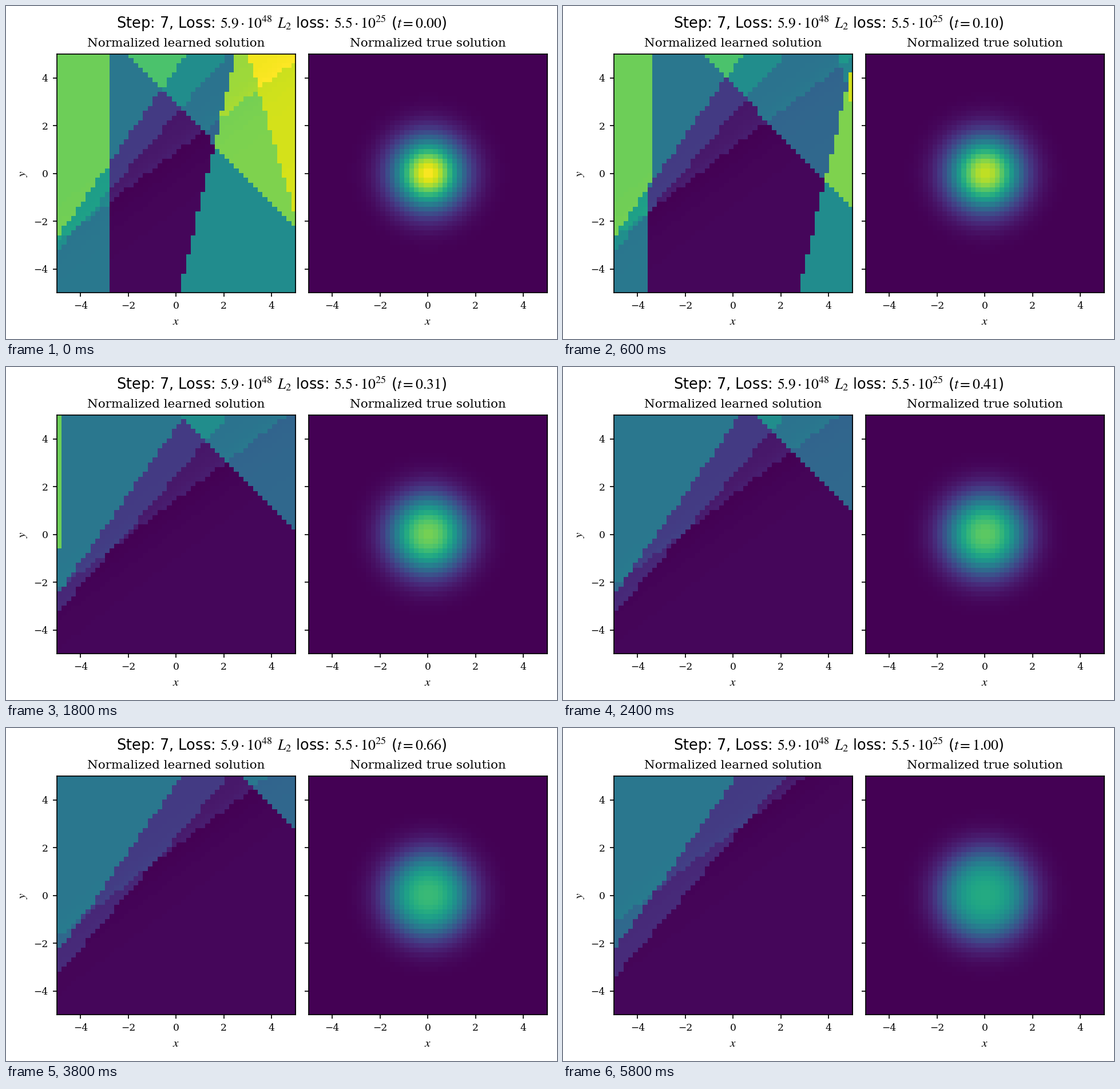
A matplotlib script for the animation above (6000 ms loop, 963 by 582 pixels).

```python
import numpy as np
import matplotlib.pyplot as plt
from matplotlib.animation import FuncAnimation

W, H, DPI = 963, 582, 154
FRAMES, INTERVAL = 30, 200
N = 50

plt.rcParams.update({
    "font.family": "DejaVu Serif",
    "mathtext.fontset": "stix",
    "axes.titlesize": 10,
    "axes.labelsize": 10,
    "xtick.labelsize": 8,
    "ytick.labelsize": 8,
})

centers = -5 + 10 * (np.arange(N) + 0.5) / N
X, Y = np.meshgrid(centers, centers)


def learned(t):
    """Sum of steps across straight fronts that drift with time."""
    left = X < -2.793 - 6.76 * t + 0.018 * Y
    upper = Y > 2.84 + 7.6 * t - 1.0275 * X
    right = X > 1.3 + 25.1 * t + 0.238 * Y
    corner = X > 4.44 + 12.9 * t - 0.29 * Y
    steep = Y > 1.42 * X + 4.4 + 0.4 * t
    middle = Y > (1.155 + 0.025 * t) * X + 2.5 - 0.09 * t
    d = Y - (0.76 * X + 0.9 + 1.75 * t)
    ridge = np.where(d > 0,
                     0.06 + 0.025 * np.exp(-np.abs(d) / 0.5),
                     0.018 * (1 - np.exp(-np.abs(d) / 1.2)))
    return (0.385 * left + 0.32 * upper + 0.47 * right + 0.13 * corner
            + 0.225 * steep + 0.11 * middle + ridge)


def true_solution(t, grow=0.2, damp=1.2):
    """Gaussian bump flattened by cubic damping."""
    g = np.exp(-(X**2 + Y**2) / (2 * (1 + 0.1 * t)))
    gain = damp / grow * (np.exp(2 * grow * t) - 1)
    return g * np.exp(grow * t) / np.sqrt(1 + gain * g**2)


def heading(t):
    return (r"Step: 7, Loss: $5.9\cdot 10^{48}$ $L_2$ loss: "
            rf"$5.5\cdot 10^{{25}}$ ($t={t:.2f}$)")


# The small margin keeps the pixel size from rounding down.
fig = plt.figure(figsize=((W + 0.01) / DPI, (H + 0.01) / DPI), dpi=DPI,
                 facecolor="white")


def panel(x0, title, data):
    ax = fig.add_axes([x0 / W, 1 - 501.5 / H, 417 / W, 417.5 / H])
    im = ax.imshow(data, extent=(-5, 5, -5, 5), origin="lower", vmin=0, vmax=1,
                   cmap="viridis", interpolation="nearest", aspect="auto")
    ax.set_title(title)
    ax.set_xlabel("$x$")
    ax.set_xticks(range(-4, 5, 2))
    ax.set_yticks(range(-4, 5, 2))
    return ax, im


ax_l, im_l = panel(88.7, "Normalized learned solution", learned(0))
ax_r, im_r = panel(528.6, "Normalized true solution", true_solution(0))
ax_l.set_ylabel("$y$")
ax_r.tick_params(labelleft=False)
head = fig.text(0.5, 1 - 39 / H, heading(0), ha="center", va="baseline",
                fontsize=12, family="DejaVu Sans")


def update(i):
    t = i / (FRAMES - 1)
    im_l.set_data(learned(t))
    im_r.set_data(true_solution(t))
    head.set_text(heading(t))
    return im_l, im_r, head


anim = FuncAnimation(fig, update, frames=FRAMES, interval=INTERVAL,
                     repeat=True, repeat_delay=0)
plt.show()
```
